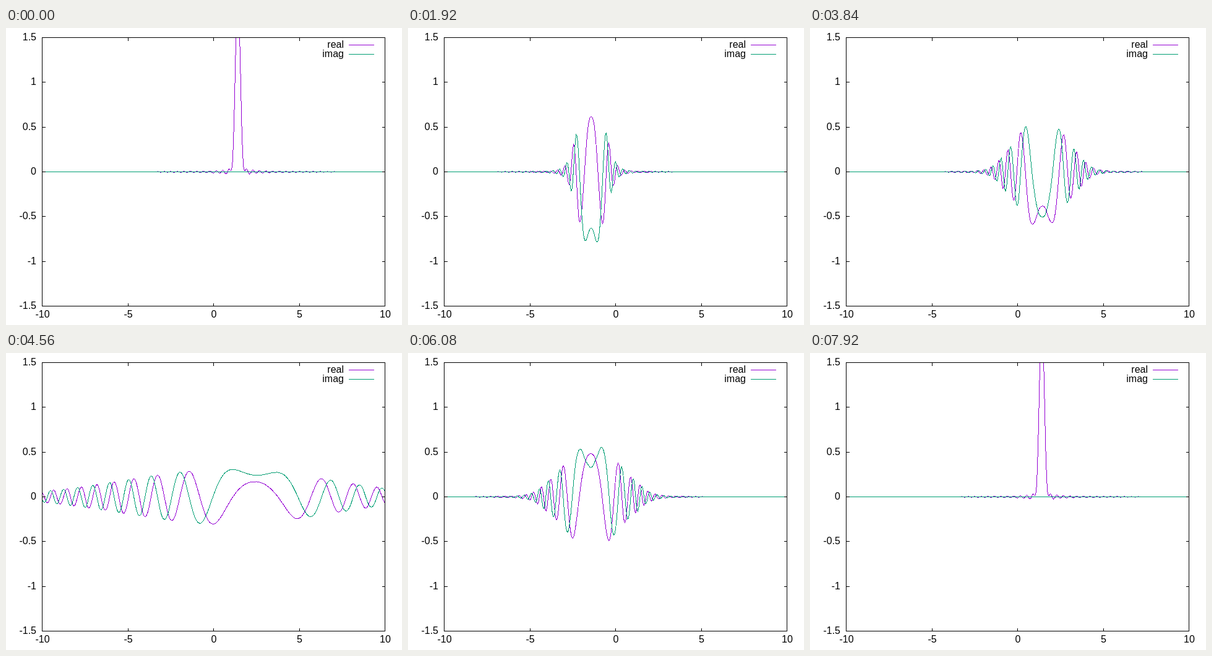
Recreate the animation shown at these times as an HTML page. Size 640 by 480 pixels, loop 8000 ms.

```html
<!DOCTYPE html>
<html lang="en">
<head>
<meta charset="utf-8">
<title>Squeezed state in a harmonic well</title>
<style>
  html, body { margin: 0; width: 100%; height: 100%; overflow: hidden; background: #fff; }
  svg { display: block; }
  text { font: 16px "Liberation Sans", Arial, sans-serif; }
  path { fill: none; stroke: #000; shape-rendering: crispEdges; }
  .real { stroke: #9400d3; }
  .imag { stroke: #009e73; }
  .end { text-anchor: end; }
  .mid { text-anchor: middle; }
</style>
</head>
<body>
<svg width="640" height="480" viewBox="0 0 640 480">
  <clipPath id="plot"><rect x="58" y="15" width="555" height="435"/></clipPath>
  <g clip-path="url(#plot)">
    <path id="real" class="real"/>
    <path id="imag" class="imag"/>
  </g>
  <text class="end" x="546" y="31.5">real</text>
  <path class="real" d="M554 27.5H595"/>
  <text class="end" x="546" y="46.5">imag</text>
  <path class="imag" d="M554 42.5H595"/>
  <path id="axes"/>
  <g id="labels"></g>
</svg>
<script>
const LEVELS = 136, STEP = 0.05, FRAMES = 100, FRAME_MS = 80;
const byId = id => document.getElementById(id);
const px = x => 335.5 + x * 27.7;
const py = y => 232.5 - y * 434 / 3;

function drawAxes() {
  let d = 'M58.5 15.5H612.5V449.5H58.5Z', labels = '';
  for (let x = -10; x <= 10; x += 5) {
    d += `M${px(x)} 449.5v-5M${px(x)} 15.5v5`;
    labels += `<text class="mid" x="${px(x) + 0.5}" y="468">${x}</text>`;
  }
  for (let y = -1.5; y <= 1.5; y += 0.5) {
    d += `M58.5 ${py(y)}h5M612.5 ${py(y)}h-5`;
    labels += `<text class="end" x="49" y="${Math.round(py(y) + 4.4)}">${y}</text>`;
  }
  byId('axes').setAttribute('d', d);
  byId('labels').innerHTML = labels;
}

// Number-state amplitudes of a Gaussian of width e^-2 centred on sqrt(2)
function amplitudes() {
  const s = Math.exp(-2), g = 1 / (s * s);
  const c = [Math.sqrt(2 * s / (1 + s * s)) * Math.exp(-1 / (1 + s * s))];
  for (let n = 0; n < LEVELS - 1; n++)
    c.push((2 * g * c[n] - (g - 1) * Math.sqrt(n) * (c[n - 1] || 0)) / ((g + 1) * Math.sqrt(n + 1)));
  return c;
}

// Normalised oscillator eigenfunctions at x
function eigenfunctions(x) {
  const h = [Math.PI ** -0.25 * Math.exp(-x * x / 2)];
  for (let n = 0; n < LEVELS - 1; n++)
    h.push(Math.sqrt(2 / (n + 1)) * x * h[n] - Math.sqrt(n / (n + 1)) * (h[n - 1] || 0));
  return h;
}

const coeffs = amplitudes();
const samples = Array.from({ length: 20 / STEP + 1 }, (_, i) => {
  const x = -10 + i * STEP;
  return { x, terms: eigenfunctions(x).map((h, n) => h * coeffs[n]) };
});

function drawWave(time) {
  const cos = coeffs.map((_, n) => Math.cos((n + 0.5) * time));
  const sin = coeffs.map((_, n) => -Math.sin((n + 0.5) * time));
  const curve = phase => 'M' + samples.map(({ x, terms }) => {
    const y = terms.reduce((sum, term, n) => sum + term * phase[n], 0);
    return px(x).toFixed(2) + ' ' + py(y).toFixed(2);
  }).join('L');
  byId('real').setAttribute('d', curve(cos));
  byId('imag').setAttribute('d', curve(sin));
}

let shown = -1;
function tick() {
  const frame = Math.floor(performance.now() / FRAME_MS) % FRAMES;
  if (frame !== shown) drawWave(4 * Math.PI * frame / (FRAMES - 1));
  shown = frame;
  requestAnimationFrame(tick);
}

drawAxes();
tick();
</script>
</body>
</html>
```
